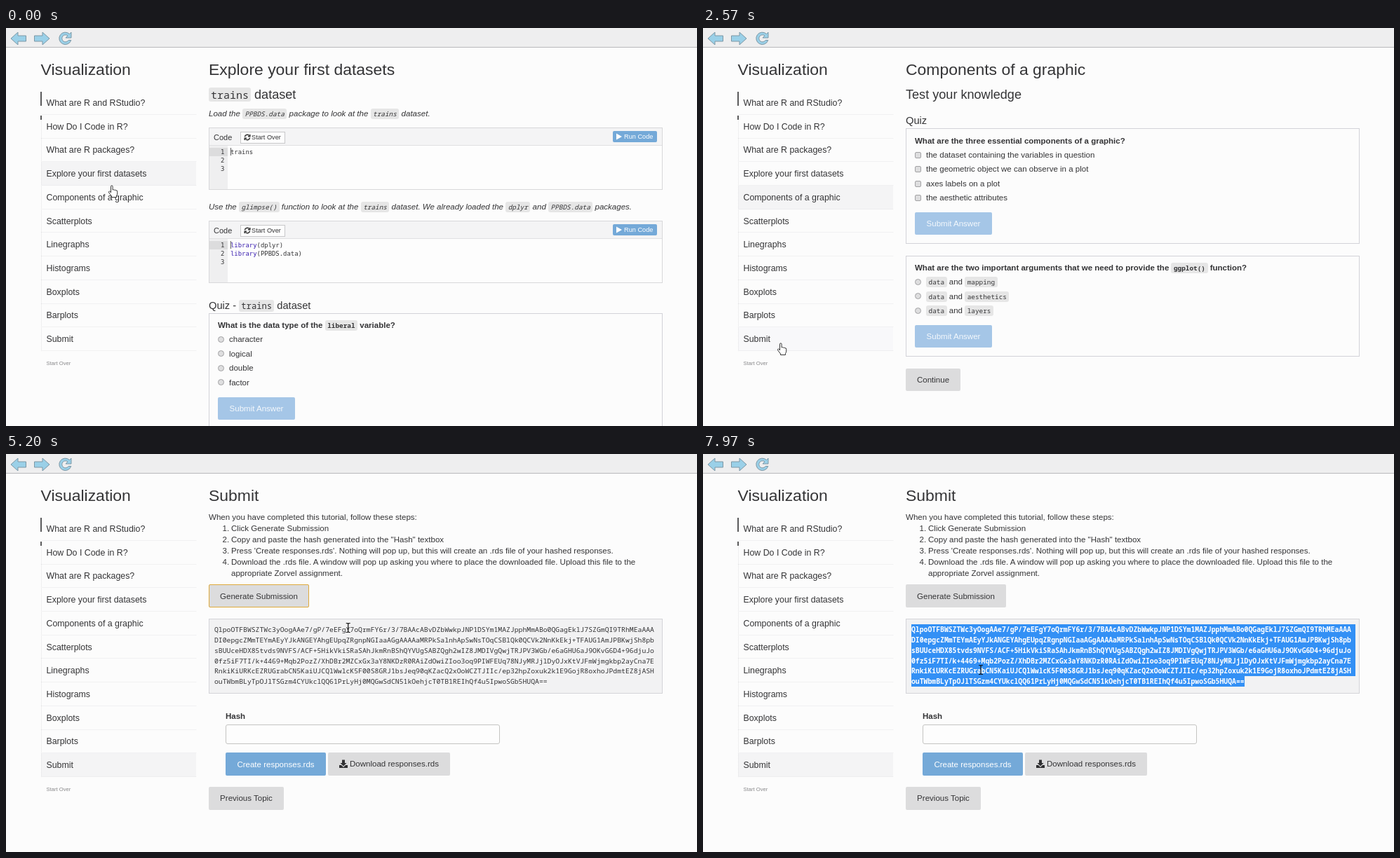
Write an HTML page that moves like this. It is 985 px wide and 568 px high and loops after 8 s.

```html
<!DOCTYPE html>
<html lang="en">
<head>
<meta charset="utf-8">
<title>Tutorial walkthrough</title>
<style>
html, body { margin: 0; width: 100%; height: 100%; overflow: hidden; background: #fcfcfc; }
#stage { position: absolute; left: 0; top: 0; width: 985px; height: 568px; overflow: hidden;
  font-family: "Liberation Sans", Arial, sans-serif; color: #343436; }
#stage div, #stage svg { position: absolute; box-sizing: border-box; }
svg { overflow: visible; }
.t { height: 20px; line-height: 20px; white-space: pre; }
.i { font-style: italic; }
.b { font-weight: bold; }
.white { color: #fff; }
.faint { color: #88888a; }
code { font-family: "Noto Sans Mono", monospace; font-size: 9.4px; line-height: 0;
  background: #e6e6e6; border-radius: 3px; padding: 1px 3.5px; }
.h3 code { font-size: 15px; padding: 0 3px; }
.h4 code { font-size: 12.2px; padding: 0 3px; }
.ace { font-family: "DejaVu Sans Mono", monospace; }
.ace b { font-weight: normal; color: #3a1fb0; }
.bar { background: #eeeeef; border-bottom: 1px solid #b9b9bc; }
.row { border-bottom: 1px dotted #e6e6e8; }
.side { border-left: 1px dotted #e2e2e4; }
.panel { border: 1px solid #d8d8da; background: #fdfdfd; }
.head { background: #f4f4f5; border-bottom: 1px solid #e0e0e2; }
.gutter { background: #efeff0; }
.now { background: #dcdcdd; }
.quiz { border: 1px solid #d2d2d8; }
.btn { display: flex; align-items: center; justify-content: center; border-radius: 2px;
  font-size: 11.54px; white-space: pre; }
.grey { background: #dcdcdd; }
.blue { background: #74a9d8; color: #fff; }
.pale { background: #a5c6e7; color: #f4f8fc; }
.over { background: #fdfdfd; border: 1px solid #c8c8ca; }
.radio, .check { background: #dededf; border: 1px solid #a2a2a4; }
.radio { border-radius: 50%; }
.check { border-radius: 2px; }
.dark { background: #5a5a5c; }
.pre { background: #f2f2f3; border: 1px solid #d4d4d8; }
.input { background: #fdfdfd; border: 1px solid #c4c4c2; border-radius: 3px; }
#generate { outline-offset: -1px; }
#hash { left: 297px; top: 243px; font: 9.78px/16.2px "Noto Sans Mono", monospace; white-space: pre; }
#hash p { margin: 0; height: 14.86px; }
#hash span { display: inline-block; height: 14.86px; vertical-align: top;
  background: #3390f5; color: #fff; font-weight: bold; }
#hash i { display: inline-block; vertical-align: top; font-style: normal; }
#hash p:not(:last-child) span:not(:empty) { padding-right: 6px; }
</style>
</head>
<body>
<div id="stage"></div>
<script>
const LOOP = 8000, ROW_TOP = 90.3, ROW = 33.7;
const HASH_X = 297, HASH_Y = 243, LINE = 14.86, CHAR = 5.868;
const TOPICS = ['What are R and RStudio?', 'How Do I Code in R?', 'What are R packages?',
  'Explore your first datasets', 'Components of a graphic', 'Scatterplots', 'Linegraphs',
  'Histograms', 'Boxplots', 'Barplots', 'Submit'];
const HASH = [
  'QlpoOTFBWSZTWc3yOogAAe7/gP/7eEFgY7oQrmFY6r/3/7BAAcABvDZbWwkpJNP1DSYm1MAZJpphMmABo0QGagEklJ7SZGmQI9TRhMEaAAA',
  'DI0epgcZMmTEYmAEyYJkANGEYAhgEUpqZRgnpNGIaaAGgAAAAaMRPkSalnhApSwNsTOqCSBlQk0QCVk2NnKkEkj+TFAUG1AmJPBKwjSh8pb',
  'sBUUceHDX85tvds9NVFS/ACF+5HikVkiSRaSAhJkmRnBShQYVUgSABZQgh2wIZ8JMDIVgQwjTRJPV3WGb/e6aGHU6aJ9OKvG6D4+96djuJo',
  '0fz5iF7TI/k+4469+Mqb2PozZ/XhDBr2MZCxGx3aY8NKDzR0RAiZdOwiZIoo3oq9PIWFEUq78NJyMRJjlDyOJxKtVJFmWjmgkbp2ayCna7E',
  'RnkiKiURKcEZRUGrabCN5KaiUJCQlWwlcK5F00S8GRJ1bsJeq90qKZacQ2xOoWCZTJIIc/ep32hpZoxuk2k1E9GojR8oxhoJPdmtEZ8jASH',
  'ouTWbmBLyTpOJlTSGzm4CYUkclQQ61PrLyHj0MQGwSdCN51kOehjcT0TB1REIhQf4u5IpwoSGb5HUQA=='];

// Pointer hot spot: time, x, y
const PATH = [[0, 151, 225], [300, 149, 236], [480, 148, 238], [870, 141, 269], [1700, 126, 365],
  [2570, 111, 450], [2800, 112, 448], [3170, 167, 398], [3450, 230, 330], [4050, 371, 197],
  [4650, 371, 197], [5030, 400, 224], [5800, 795, 332], [6150, 795, 332], [6700, 640, 300],
  [7400, 430, 262], [7700, 293, 247], [7960, 396, 308], [8000, 396, 308]];
const AT = { graphic: 480, submit: 2760, press: 4180, hash: 4250, drag: 6150, release: 7700, blur: 5950 };

const text = (x, y, html, size = 11.54, cls = '') =>
  `<div class="t ${cls}" style="left:${x}px;top:${y - 10}px;font-size:${size}px">${html}</div>`;
const box = (x, y, w, h, cls, html = '', id = '') =>
  `<div ${id && `id="${id}"`} class="${cls}" style="left:${x}px;top:${y}px;width:${w}px;height:${h}px">${html}</div>`;
const shape = (x, y, d, attrs, id = '') =>
  `<svg ${id && `id="${id}"`} style="left:${x}px;top:${y}px" width="1" height="1"><path d="${d}" ${attrs}/></svg>`;
const code = s => `<code>${s}</code>`;

const title = s => text(289, 59, s, 22.95);
const choices = (kind, ys, labels) => ys.map((y, i) =>
  box(302, y - 4.5, 9, 9, kind) + text(318, y, labels[i])).join('');
const answer = y => box(302, y, 110, 32, 'btn pale', 'Submit Answer');

function editor(y, lines) {
  const spin = 'M-3.6 -.6A3.6 3.6 0 0 1 2.6 -2.6M3.6 .6A3.6 3.6 0 0 1 -2.6 2.6M3.8 -4V-1.2H1M-3.8 4V1.2H-1';
  return box(289, y, 647, 89, 'panel') + box(290, y + 1, 645, 25, 'head') +
    text(296, y + 14, 'Code', 11) +
    box(334, y + 5.5, 64, 17, 'over') + text(350, y + 14, 'Start Over', 9.2) +
    shape(343.5, y + 14, spin, 'fill="none" stroke="#333" stroke-width="1.5"') +
    box(865, y + 5, 63, 16, 'btn blue') + text(881, y + 13, 'Run Code', 9.2, 'white') +
    shape(870, y + 13, 'M0 -4.5L8 0L0 4.5Z', 'fill="#fff"') +
    box(290, y + 26, 26, 62, 'gutter') + box(290, y + 29, 26, 12, 'now') +
    [0, 1, 2].map(i => text(306, y + 35 + 12 * i, i + 1, 8.92, 'ace') +
      text(320, y + 35 + 12 * i, lines[i] || '', 8.92, 'ace')).join('') +
    box(319.5, y + 29, 1, 11, 'dark');
}

const pages = [
  title('Explore your first datasets') +
  text(289, 95, code('trains') + ' dataset', 18.1, 'h3') +
  text(289, 122, `Load the ${code('PPBDS.data')} package to look at the ${code('trains')} dataset.`, 11.54, 'i') +
  editor(142, ['trains']) +
  text(289, 255, `Use the ${code('glimpse()')} function to look at the ${code('trains')} dataset. ` +
    `We already loaded the ${code('dplyr')} and ${code('PPBDS.data')} packages.`, 11.54, 'i') +
  editor(275, ['<b>library</b>(dplyr)', '<b>library</b>(PPBDS.data)']) +
  text(289, 396, `Quiz - ${code('trains')} dataset`, 14.7, 'h4') +
  box(289, 407, 647, 200, 'quiz') +
  text(302, 424, `What is the data type of the ${code('liberal')} variable?`, 11.5, 'b') +
  choices('radio', [444, 464.5, 485, 505.5], ['character', 'logical', 'double', 'factor']) +
  answer(526.5),

  title('Components of a graphic') + text(289, 95, 'Test your knowledge', 18.1) +
  text(289, 132, 'Quiz', 14.7) + box(289, 143, 647, 165, 'quiz') +
  text(302, 160.5, 'What are the three essential components of a graphic?', 11.5, 'b') +
  choices('check', [181, 201, 222, 242], ['the dataset containing the variables in question',
    'the geometric object we can observe in a plot', 'axes labels on a plot', 'the aesthetic attributes']) +
  answer(263) + box(289, 324.5, 647, 144.5, 'quiz') +
  text(302, 342, `What are the two important arguments that we need to provide the ${code('ggplot()')} function?`, 11.5, 'b') +
  choices('radio', [362, 382.5, 403],
    ['mapping', 'aesthetics', 'layers'].map(s => `${code('data')} and ${code(s)}`)) +
  answer(424) + box(289, 485.5, 78, 32, 'btn grey', 'Continue'),

  title('Submit') + text(289, 90, 'When you have completed this tutorial, follow these steps:') +
  ['Click Generate Submission', 'Copy and paste the hash generated into the "Hash" textbox',
    "Press 'Create responses.rds'. Nothing will pop up, but this will create an .rds file of your hashed responses.",
    'Download the .rds file. A window will pop up asking you where to place the downloaded file. Upload this file to the'
  ].map((s, i) => text(308.5, 106 + 16 * i, i + 1 + '.') + text(321, 106 + 16 * i, s)).join('') +
  text(321, 170, 'appropriate Zorvel assignment.') +
  box(289, 186, 143, 33, 'btn grey', 'Generate Submission', 'generate') +
  box(289, 235, 647, 32, 'pre', '', 'output') +
  '<div id="hash">' + HASH.map(() => '<p><i></i><span></span></p>').join('') + '</div>' +
  box(0, 0, 985, 568, '',
    text(313, 299, 'Hash', 11.5, 'b') + box(313, 311, 391, 28, 'input') +
    box(313, 351, 143, 33, 'btn blue', 'Create responses.rds') +
    box(459, 351, 174, 33, 'btn grey') + text(490, 367, 'Download responses.rds') +
    shape(481, 367, 'M-2 -5.5H2V-1H4.5L0 3.5L-4.5 -1H-2ZM-6 2H-3L0 5L3 2H6V6H-6Z', 'fill="#303032"') +
    box(289, 400, 107, 32.5, 'btn grey', 'Previous Topic'), 'below')
];

const arrow = 'M0 0L10 -9V-4H21.5V4H10V9Z';
const icon = 'fill="#9ad0e8" stroke="#7c97a5" stroke-width="1" stroke-linejoin="round"';
const pointers = {
  hand: shape(0, 0, 'M-1.5 9V1.2a1.3 1.3 0 0 1 2.6 0V6q1.5 -.9 2.4 .3q1.6 -.7 2.3 .5q1.9 -.4 1.9 1.5V11q0 2 -1.2 3.5V16.5H-.5V15L-4.4 9.8q-.6 -1.6 .9 -1.9q1 .2 2 2Z',
    'fill="#fff" stroke="#333" stroke-width="1"', 'hand'),
  arrow: shape(0, 0, 'M0 0V12L2.8 9.4L4.7 13.8L6.5 13L4.7 8.8H8.5Z', 'fill="#fff" stroke="#333" stroke-width="1"', 'arrow'),
  beam: shape(0, 0, 'M-3 -6.5H-1L0 -5.5L1 -6.5H3M0 -5.5V5.5M-3 6.5H-1L0 5.5L1 6.5H3', 'fill="none" stroke="#111" stroke-width="1.2"', 'beam')
};

document.getElementById('stage').innerHTML =
  box(0, 0, 985, 28, 'bar') + shape(6.5, 15, arrow, icon) +
  shape(61.5, 15, arrow, icon + ' transform="scale(-1,1)"') +
  shape(84, 15, 'M9 -9V-1H1L4 -4A5 5 0 1 0 5 2.5H8.8A8.7 8.7 0 1 1 6.5 -6.5Z', icon) +
  text(49.5, 59, 'Visualization', 22.95) +
  TOPICS.map((s, i) => box(50, ROW_TOP + ROW * i, 221, ROW, 'row', '', 'row' + i) +
    text(57.5, 107 + ROW * i, s, 12.37)).join('') +
  box(50, 130, 1, 331, 'side') + box(49, 91, 1.5, 20, 'dark') + box(49, 124.5, 1.5, 6, 'dark') +
  text(57.5, 479, 'Start Over', 7.65, 'faint') +
  pages.map((p, i) => box(0, 0, 985, 568, '', p, 'page' + i)).join('') +
  Object.values(pointers).join('');

const el = id => document.getElementById(id);
const show = (id, on) => { el(id).style.visibility = on ? 'visible' : 'hidden'; };
const lines = [...document.querySelectorAll('#hash p')];

function position(t) {
  const i = Math.max(1, PATH.findIndex(p => p[0] > t));
  const [t0, x0, y0] = PATH[i - 1], [t1, x1, y1] = PATH[i];
  const k = (t - t0) / (t1 - t0);
  return [x0 + (x1 - x0) * k, y0 + (y1 - y0) * k];
}

// Selection runs from the pointer to the end of the text.
function selectionStart(t) {
  if (t < AT.drag) return [HASH.length, 0];
  if (t >= AT.release) return [0, 0];
  const [x, y] = position(t);
  const clamp = (v, max) => Math.max(0, Math.min(max, v));
  const row = clamp(Math.floor((y - HASH_Y) / LINE), HASH.length - 1);
  return [row, clamp(Math.round((x - HASH_X) / CHAR), HASH[row].length)];
}

function draw(t) {
  const page = t < AT.graphic ? 0 : t < AT.submit ? 1 : 2;
  const hashed = t >= AT.hash;
  const [x, y] = position(t);
  const over = x < 271 && x > 50 ? Math.floor((y - ROW_TOP) / ROW) : -1;
  const active = [3, 4, 10][page];

  pages.forEach((_, i) => { el('page' + i).style.display = i === page ? 'block' : 'none'; });
  TOPICS.forEach((_, i) => {
    el('row' + i).style.background = i === active ? '#f4f4f5' : i === over ? '#f8f8fa' : 'none';
  });

  el('generate').style.outline = t >= AT.press && t < AT.blur ? '1px solid #dfaa3c' : 'none';
  el('output').style.height = (hashed ? 107 : 32) + 'px';
  el('below').style.top = (hashed ? 75 : 0) + 'px';
  el('hash').style.display = hashed ? 'block' : 'none';
  const [row, col] = selectionStart(t);
  lines.forEach((p, i) => {
    const cut = i < row ? HASH[i].length : i > row ? 0 : col;
    p.children[0].textContent = HASH[i].slice(0, cut);
    p.children[1].textContent = HASH[i].slice(cut);
  });

  const onButton = page === 2 && x > 289 && x < 432 && y > 186 && y < 219;
  const onText = hashed && x > 290 && x < 930 && y > HASH_Y && y < (x < 772 ? 332 : 318);
  const kind = over >= 0 || onButton ? 'hand' : onText || t > AT.drag ? 'beam' : 'arrow';
  for (const id in pointers) {
    show(id, id === kind);
    el(id).style.transform = `translate(${x}px,${y}px)`;
  }
}

const start = performance.now();
function tick() {
  draw((performance.now() - start) % LOOP);
  requestAnimationFrame(tick);
}
tick();
</script>
</body>
</html>
```
